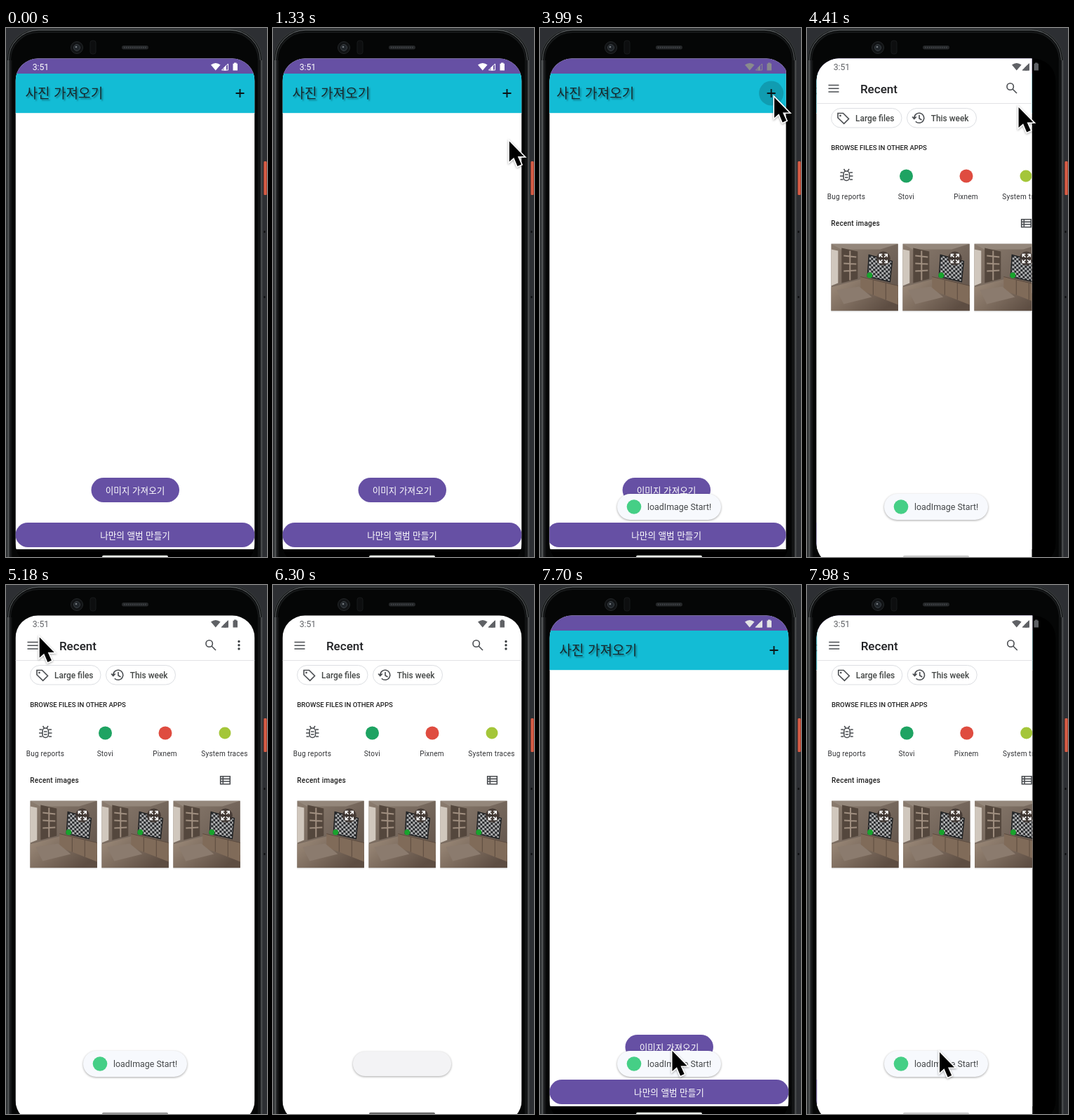
An HTML page that plays this animation: 372x754 px, repeating every 8000 ms.

```html
<!DOCTYPE html>
<html lang="ko">
<head>
<meta charset="utf-8">
<title>Image import</title>
<style>
  html, body { margin: 0; width: 100%; height: 100%; overflow: hidden; background: #2b2d30; }
  svg { display: block; width: 372px; height: 754px; }
  text { font-family: Roboto, "Noto Sans CJK KR", "Noto Sans CJK", sans-serif; }
  .ko { font-family: "Noto Sans CJK KR", "Noto Sans CJK", "Noto Sans CJK JP", sans-serif; }
  .mid { text-anchor: middle; }
  .title { font-size: 19.1px; fill: #17282c; text-shadow: 2px 2px 2px rgba(0, 0, 0, .35); }
  .button { font-size: 12.6px; fill: #fff; }
  .chip { font-size: 11.9px; font-weight: 500; fill: #444746; }
  .head { font-size: 9.6px; font-weight: 500; fill: #1f1f1f; }
  .label { font-size: 10px; letter-spacing: .24px; fill: #303134; text-anchor: middle; }
  .line { fill: none; stroke: #4a4d51; stroke-width: 1.6; }
  .soft { filter: drop-shadow(0 1px 1.5px rgba(0, 0, 0, .35)); }
</style>
</head>
<body>
<svg viewBox="0 0 372 754">
  <defs>
    <clipPath id="screen"><rect x="13.5" y="43.5" width="341" height="723" rx="32"/></clipPath>
    <clipPath id="crop"><rect id="cropBox" x="13.5" y="43" width="341" height="724"/></clipPath>
    <clipPath id="thumbBox"><rect width="95.5" height="95.5"/></clipPath>
    <linearGradient id="wall" x2="1" y2="1">
      <stop stop-color="#8b7c6f"/><stop offset=".5" stop-color="#74665b"/><stop offset="1" stop-color="#5c4f46"/>
    </linearGradient>
    <linearGradient id="floor" x2="1" y2=".6">
      <stop stop-color="#a08e7d"/><stop offset="1" stop-color="#5d4d42"/>
    </linearGradient>
    <linearGradient id="side">
      <stop stop-color="#25282a"/><stop offset=".3" stop-color="#595c5d"/><stop offset=".5" stop-color="#222426"/><stop offset="1" stop-color="#080909"/>
    </linearGradient>
    <linearGradient id="power"><stop stop-color="#7a3027"/><stop offset=".4" stop-color="#ee6a50"/><stop offset="1" stop-color="#a63f2e"/></linearGradient>
    <pattern id="checks" width="6" height="6" patternUnits="userSpaceOnUse" patternTransform="skewY(8)">
      <rect width="6" height="6" fill="#25272a"/><path d="M0 0h3v6h3V3H0Z" fill="#b4b5b6"/>
    </pattern>
    <g id="thumb">
      <rect width="95.5" height="97" fill="#ddd"/>
      <g clip-path="url(#thumbBox)">
        <rect width="96" height="96" fill="url(#wall)"/>
        <path d="M0 0H96L70 8H14Z" fill="#94877b"/>
        <path d="M0 62L45 50L96 78V96H0Z" fill="url(#floor)"/>
        <path d="M0 8L10 10V56L0 60Z" fill="#d0c7bd"/>
        <path d="M15 6L38 11V50L15 56Z" fill="#54473d"/>
        <path d="M18 17l18 2M18 28l18 1M18 39l18-1M27 10v42" stroke="#a08f80" stroke-width="2"/>
        <path d="M42 47L96 60V87L42 66Z" fill="#806b59"/>
        <path d="M42 47L96 60M60 52V73M78 56V80" fill="none" stroke="#5c4b3f"/>
        <path d="M8 66L40 61L58 76L18 86Z" fill="#8b7b6e"/>
        <path d="M54 16L87 25L84 54L52 47Z" fill="url(#checks)" stroke="#202224" stroke-width="1.5"/>
        <circle cx="55" cy="45" r="4" fill="#18a32d"/>
        <circle cx="74.5" cy="21" r="10" fill="#3c332d" opacity=".8"/>
        <path d="M69 19v-4h4M76 15h4v4M80 23v4h-4M73 27h-4v-4M69.5 15.5l3.7 3.7M79.500 15.500l-3.700 3.700M79.500 26.500l-3.700-3.700M69.500 26.500l3.700-3.700" fill="none" stroke="#fff" stroke-width="1.5"/>
      </g>
    </g>
  </defs>

  <!-- Phone body -->
  <rect width="372" height="754" fill="#2d2f33"/>
  <rect x="1" y="1" width="364" height="800" rx="45" fill="#060707" stroke="#303335" stroke-width="2"/>
  <rect x="3.5" y="3" width="359" height="800" rx="43" fill="none" stroke="#54585a" stroke-width="1.3"/>
  <rect x="6" y="6" width="354" height="800" rx="40" fill="#050606" stroke="#17191a" stroke-width="2"/>
  <rect x="1" y="46" width="8" height="708" fill="url(#side)"/>
  <rect x="-366" y="46" width="6" height="708" fill="url(#side)" transform="scale(-1 1)"/>
  <rect x="367" y="190" width="5" height="48" rx="1.5" fill="url(#power)"/>
  <path d="M368.500 289v3M368.500 382v3" stroke="#0c0d0e" stroke-width="2"/>
  <circle cx="101" cy="28" r="8.500" fill="#111315" stroke="#242729"/>
  <circle cx="101" cy="28" r="4.500" fill="#20252a" stroke="#3b4044"/>
  <circle cx="100" cy="27" r="1.300" fill="#777d82"/>
  <rect x="120" y="18" width="8" height="19" rx="3" fill="#0d0e0f" stroke="#17191a"/>
  <rect x="165" y="25" width="38" height="5.500" rx="2.700" fill="#252729"/>
  <path d="M168 27.700h32" stroke="#42464a" stroke-width="2" stroke-dasharray="1.500 1.500"/>

  <g clip-path="url(#screen)">
    <rect x="13" y="43" width="342" height="724"/>
    <g id="home">
      <rect x="13.500" y="43" width="341" height="700" fill="#fff"/>
      <rect x="13.500" y="43" width="341" height="22.500" fill="#6650a4"/>
      <rect x="13.500" y="65" width="341" height="56" fill="#13bcd5"/>
      <path d="M13.500 121.500h341" stroke="#d8f1f4"/>
      <rect x="13.500" y="743" width="341" height="24"/>
      <text class="ko title" x="27.500" y="100">사진 가져오기</text>
      <circle id="hover" cx="333.500" cy="93" r="17.500" opacity=".17"/>
      <path d="M327.500 93h12M333.500 87v12" stroke="#0b1517" stroke-width="1.900"/>
      <rect x="121.500" y="641" width="125.500" height="35" rx="17.500" fill="#6650a4"/>
      <text class="ko button mid" x="184" y="663.500">이미지 가져오기</text>
      <rect x="13.500" y="705" width="341" height="35" rx="17.500" fill="#6650a4"/>
      <text class="ko button mid" x="184" y="727.500">나만의 앨범 만들기</text>
      <g id="tip">
        <rect class="soft" x="274.500" y="121" width="73.500" height="29" rx="1.700" fill="#707070"/>
        <text class="ko mid" x="311" y="140.300" font-size="12.200" fill="#fff">추가하기</text>
      </g>
    </g>

    <g id="picker"><g clip-path="url(#crop)">
      <rect x="13" y="43" width="342" height="724" fill="#fff"/>
      <path class="line" d="M30.500 81.500h15M30.500 86.200h15M30.500 91h15"/>
      <text x="76" y="93" font-size="17" font-weight="500" fill="#202124">Recent</text>
      <circle class="line" cx="289.700" cy="83.500" r="4.700"/>
      <path class="line" d="M293 87l6 6" stroke-width="2"/>
      <path d="M332 80.500h0M332 85.800h0M332 91h0" stroke="#3c4043" stroke-width="3.400" stroke-linecap="round"/>
      <path d="M13 107.500h342" stroke="#e2e3e5"/>
      <g fill="#fff" stroke="#dcdee2">
        <rect x="34.500" y="114.500" width="100.500" height="27.500" rx="13.700"/>
        <rect x="142.500" y="114.500" width="99" height="27.500" rx="13.700"/>
      </g>
      <path class="line" d="M44 121.500h7.500l8 8-6.800 6.800-8.700-8.300Z"/><circle cx="47.500" cy="125" r="1.300" fill="#4a4d51"/>
      <text class="chip" x="69" y="132.500">Large files</text>
      <path class="line" d="M152.800 128.200a7 7 0 1 1 2 5M150 126.500l2.800 3 3-3M160 124v5l3.500 2"/>
      <text class="chip" x="176.700" y="132.500">This week</text>
      <text class="head" x="34.300" y="173.600">BROWSE FILES IN OTHER APPS</text>
      <rect class="line" x="52" y="204" width="8.500" height="13.500" rx="4.200"/>
      <path class="line" d="M47.500 206h4M61 206h4M47 211h5M60.500 211h5M47.500 216h4M61 216h4M52.500 201l2 3M60 201l-2 3M54 209h4.500M54 213h4.500"/>
      <circle cx="141.500" cy="211" r="9.500" fill="#1ea362"/>
      <circle cx="227" cy="211" r="9.500" fill="#df4c40"/>
      <circle cx="312" cy="211" r="8.500" fill="#a4c639"/>
      <text class="label" x="56" y="243.800">Bug reports</text>
      <text class="label" x="141.300" y="243.800">Stovi</text>
      <text class="label" x="226.500" y="243.800">Pixnem</text>
      <text class="label" x="311.500" y="243.800">System traces</text>
      <text class="head" x="34.300" y="282" style="font-size:10px;letter-spacing:.25px">Recent images</text>
      <path class="line" d="M305.700 272.700h13.600v11h-13.600ZM305.700 276.400h13.600M305.700 280h13.600M309.300 272.700v11" stroke-width="1.400"/>
      <use href="#thumb" x="34.300" y="307.500"/>
      <use href="#thumb" x="136.300" y="307.500"/>
      <use href="#thumb" x="238.300" y="307.500"/>
    </g></g>

    <g id="status">
      <text x="37.700" y="60" font-size="12.200">3:51</text>
      <path d="M292 52.500q6.800-5 13.600 0L298.800 60.500Z"/>
      <path id="signal" d="M317 50V60.500H306.500Z"/>
      <path d="M316.500 51V60H307.500Z" fill="none" stroke="currentColor"/>
      <path d="M310.500 60.500V56.500L314 53V60.500Z"/>
      <path d="M325 49.500h3.500v1.300h1.500v9.700h-6.500v-9.700h1.500Z"/>
    </g>
    <rect id="pill" x="137" y="751.700" width="94" height="4" rx="2"/>
    <g id="toast">
      <rect class="soft" id="toastBox" x="110" y="664" width="148" height="37" rx="18.500" fill="#f7f9fd"/>
      <g id="toastText">
        <circle cx="134" cy="682.500" r="10.300" fill="#45cf86"/>
        <text x="153" y="687" font-size="12.400" fill="#444749">loadImage Start!</text>
      </g>
    </g>
  </g>

  <g id="cursor" class="soft">
    <path d="M0 0V29L6.500 23.300L11.700 35.500L17.200 33L12 21.500H21Z" stroke="#fff" stroke-width="3.200" paint-order="stroke"/>
  </g>
</svg>

<script>
const LOOP = 8000, SLIDE = 34, DURATION = 450;
const el = id => document.getElementById(id);
const clamp = v => Math.max(0, Math.min(1, v));
const ramp = (t, from, to) => clamp((t - from) / (to - from));
const mix = (a, b, p) => a + (b - a) * p;
const rgb = (a, b, p) => `rgb(${a.map((v, i) => Math.round(mix(v, b[i], p)))})`;
const show = (id, alpha) => el(id).setAttribute('opacity', alpha);
const move = (id, x, y = 0, more = '') => el(id).setAttribute('transform', `translate(${x} ${y})${more}`);

// time, x, y of the pointer tip
const path = [
  [420, 220, 645], [700, 266, 520], [1190, 333, 180], [1450, 340, 146], [1820, 334, 100],
  [1960, 335, 95], [3080, 335, 95], [3150, 334, 99], [3990, 334, 99], [4130, 331, 101],
  [4410, 302, 113], [4900, 94, 118], [5180, 48, 75], [5460, -30, -45], [6600, -30, 80],
  [6930, 187, 671], [7000, 187, 671], [7140, 188.5, 664], [7900, 188.5, 664], [7980, 189, 666]
];
const switches = [
  { at: -9000, open: false }, { at: 3942, open: true },
  { at: 6450, open: false }, { at: 7697, open: true }
];
const toasts = [{ from: 3800, to: 6160 }, { from: 7550, to: 9900 }];

const cubic = (a, b, c, d, s) => {
  const r = 1 - s;
  return a * r ** 3 + 3 * b * s * r * r + 3 * c * s * s * r + d * s ** 3;
};

// Two joined curves: a quick start and a very slow finish
function slideEase(x) {
  if (x <= 0 || x >= 1) return clamp(x);
  const k = 1 / 6;
  const [xs, ys] = x < k
    ? [[0, .05, .1333, k], [0, 0, .06, .4]]
    : [[k, .2083, .25, 1], [.4, .82, 1, 1]];
  let low = 0, high = 1;
  for (let i = 0; i < 20; i++) {
    const s = (low + high) / 2;
    if (cubic(...xs, s) < x) low = s; else high = s;
  }
  return cubic(...ys, low);
}

function pointer(t) {
  const next = path.findIndex(k => k[0] > t);
  if (next < 0) return path.at(-1).slice(1);
  if (!next) return path[0].slice(1);
  const a = path[next - 1], b = path[next], p = ramp(t, a[0], b[0]);
  return [mix(a[1], b[1], p), mix(a[2], b[2], p)];
}

function drawWindows(t) {
  const { at, open } = switches.findLast(s => s.at <= t);
  const dt = t - at, p = slideEase(dt / DURATION), settled = dt > 500;
  move('home', -SLIDE * (open ? p : 1 - p));
  move('picker', SLIDE * (open ? 1 - p : p));
  show('home', open && settled ? 0 : 1);
  show('picker', open ? ramp(dt, 50, 133) : 1 - ramp(dt, 35, 118));
  el('cropBox').setAttribute('width', settled ? 341 : 341 - SLIDE);

  const dark = open ? ramp(dt, -10, 70) : 1 - ramp(dt, 0, 120);
  const ink = rgb([255, 255, 255], [95, 97, 101], dark);
  el('status').style.fill = el('status').style.color = ink;
  el('status').firstElementChild.style.opacity = open ? ramp(dt, 60, 180) : 1;
  show('signal', t > 4040 ? 1 : 0);
  const pill = open && dt > 60
    ? rgb([205, 205, 205], [105, 105, 105], ramp(dt, 480, 1900))
    : 'rgb(235,240,234)';
  el('pill').setAttribute('fill', pill);
}

function drawToast(t) {
  const { from, to } = toasts.find(k => t < k.to + 210);
  const enter = ramp(t, from, from + 130), leave = ramp(t, to, to + 200);
  const scale = mix(.92, 1, enter) - .075 * leave;
  show('toast', t < from || leave === 1 ? 0 : enter);
  show('toastText', 1 - ramp(t, to, to + 120));
  el('toastBox').setAttribute('fill', rgb([247, 249, 253], [241, 241, 242], leave));
  move('toast', 184 * (1 - scale), 682.5 * (1 - scale), ` scale(${scale})`);
}

function draw(t) {
  drawWindows(t);
  drawToast(t);
  show('hover', t >= 1960 && t < 4500 ? .17 : 0);
  show('tip', ramp(t, 2220, 2370) * (1 - ramp(t, 3700, 3800)));
  move('cursor', ...pointer(t));
  show('cursor', t < 420 ? 0 : 1);
}

function tick(now) {
  draw(now % LOOP);
  requestAnimationFrame(tick);
}
draw(0);
requestAnimationFrame(tick);
</script>
</body>
</html>
```
